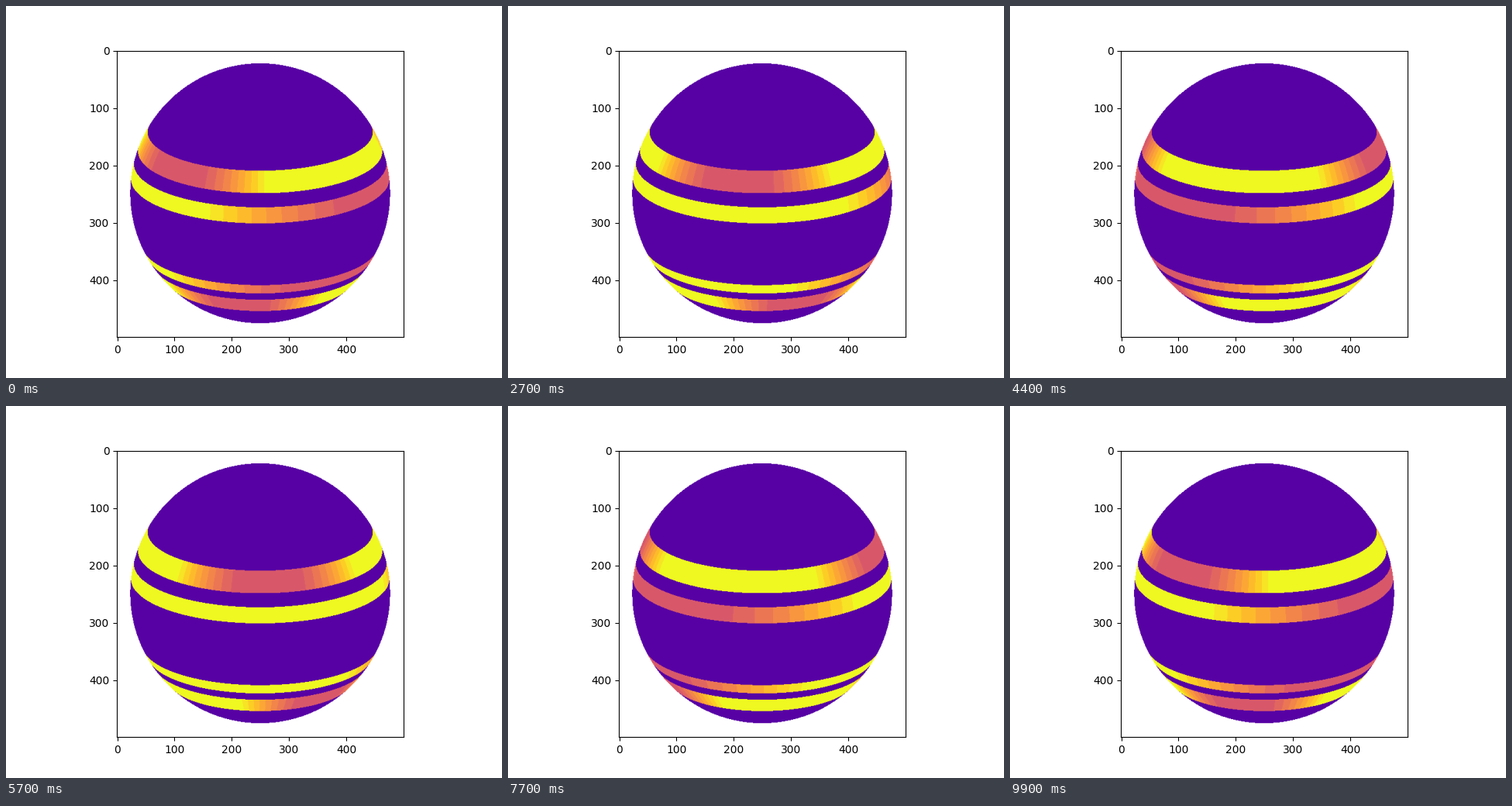
Write a matplotlib script that moves like this. It is 640 px wide and 480 px high and loops after 10000 ms.

```python
import numpy as np
import matplotlib.pyplot as plt
from matplotlib.animation import FuncAnimation

SIZE, RADIUS = 500, 226.6
TILT = np.radians(20)
FRAMES, PERIOD = 100, 33
BASE, DARKEST = 0.155, 0.56
STEPS = 9
PLASMA = plt.get_cmap("plasma")

# south edge, north edge, wave number, longitude of the dark crest (degrees)
BANDS = [
    (20, 30, 2, -45),
    (6.6, 13.8, 1, 71),
    (-30.4, -25, 1, 46),
    (-45, -35, 2, -12),
]


def sphere_coords():
    """Latitude (degrees) and longitude (radians) per pixel, NaN off the disc."""
    row, col = np.mgrid[:SIZE, :SIZE]
    x = (col - 249.5) / RADIUS
    y = (249 - row) / RADIUS
    depth2 = 1 - x**2 - y**2
    z = np.sqrt(np.where(depth2 >= 0, depth2, np.nan))
    lat = np.degrees(np.arcsin(y * np.cos(TILT) + z * np.sin(TILT)))
    lon = np.arctan2(x, z * np.cos(TILT) - y * np.sin(TILT))
    return lat, lon


def brightness(wave):
    """Saturated in the trough, then equal steps down to the dark crest."""
    step = np.clip(np.floor((wave + 0.18) / 0.11), 0, STEPS)
    return 1 - (1 - DARKEST) * step / STEPS


lat, lon = sphere_coords()
surface = np.ones((SIZE, SIZE, 3))
surface[~np.isnan(lat)] = PLASMA(BASE)[:3]

waves = []
for south, north, k, crest in BANDS:
    mask = (lat >= south) & (lat <= north)
    waves.append((mask, k * (lon[mask] - np.radians(crest))))


def render(i):
    img = surface.copy()
    turn = 2 * np.pi * i / PERIOD
    for mask, phase in waves:
        img[mask] = PLASMA(brightness(np.cos(phase + turn)))[:, :3]
    return img


fig, ax = plt.subplots(figsize=(6.4, 4.8), dpi=100)
image = ax.imshow(render(0))


def update(i):
    image.set_data(render(i))
    return [image]


anim = FuncAnimation(fig, update, frames=FRAMES, interval=100,
                     repeat=True, repeat_delay=0)
plt.show()
```
